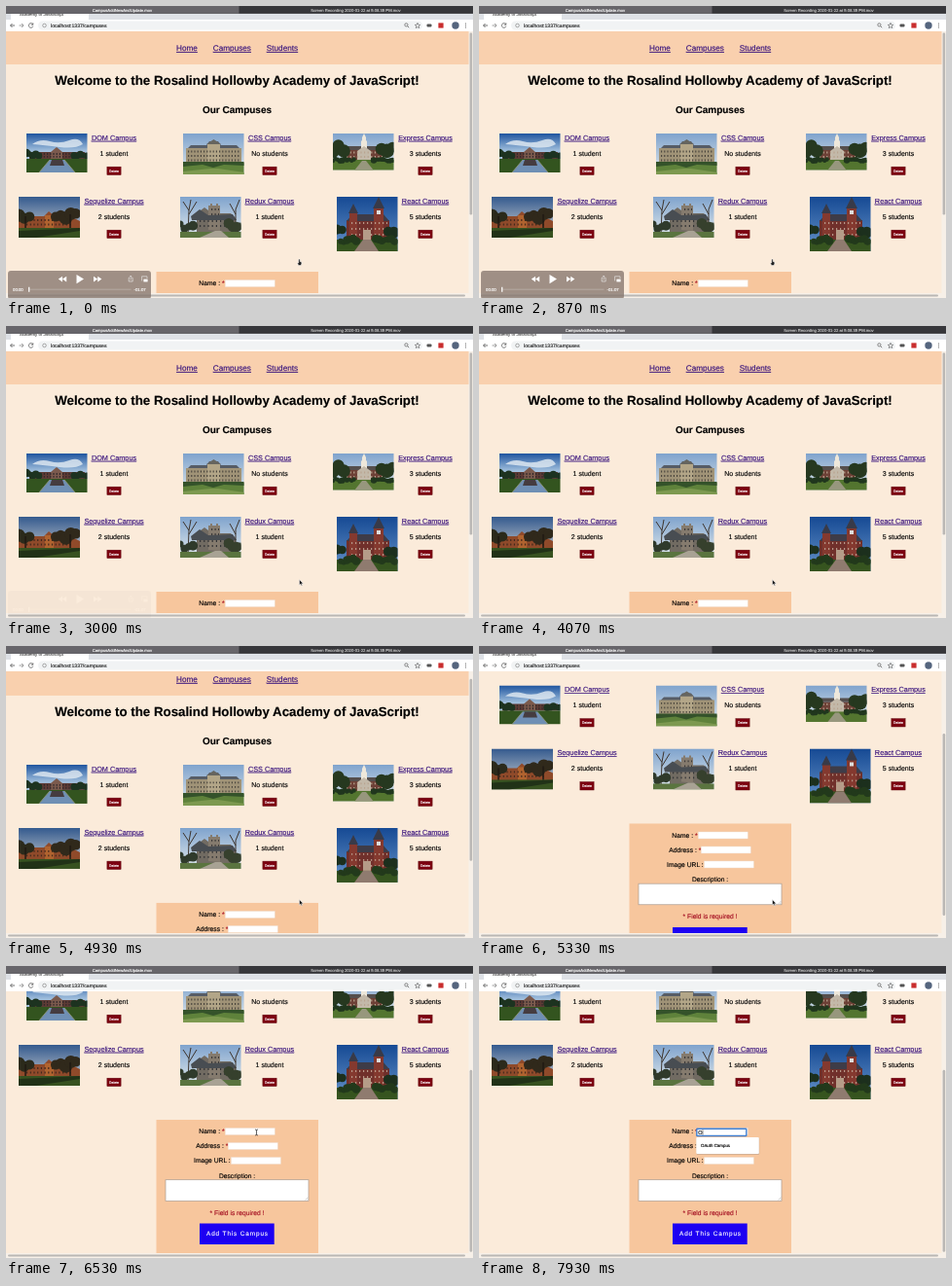
An HTML page for the animation above (8 s loop, 480 by 300 pixels).

```html
<!DOCTYPE html>
<html lang="en">
<head>
<meta charset="utf-8">
<title>Campuses</title>
<style>
html, body { margin: 0; width: 100%; height: 100%; overflow: hidden; background: #faebda; }
#stage { display: block; width: 480px; height: 300px; }
text, tspan { fill: currentColor; stroke: currentColor; stroke-width: .14px; }
text { font-family: "Liberation Sans", Arial, sans-serif; text-rendering: geometricPrecision; }
.link { color: #36107c; text-decoration: underline; text-decoration-thickness: .6px; }
.mid { text-anchor: middle; }
.req { color: #a50f22; }
</style>
</head>
<body>
<svg id="stage" viewBox="0 0 480 300" xmlns="http://www.w3.org/2000/svg">
  <defs>
    <linearGradient id="blue" x2="0" y2="1"><stop stop-color="#1f559f"/><stop offset=".7" stop-color="#a3c1de"/></linearGradient>
    <linearGradient id="deep" x2="0" y2="1"><stop stop-color="#164a94"/><stop offset=".9" stop-color="#5e8cc4"/></linearGradient>
    <linearGradient id="pale" x2="0" y2="1"><stop stop-color="#7fa3cd"/><stop offset=".8" stop-color="#cfdce6"/></linearGradient>
    <linearGradient id="dusk" x2="0" y2="1"><stop stop-color="#345a8e"/><stop offset=".7" stop-color="#a9b4c2"/></linearGradient>
  </defs>
  <rect width="480" height="300" fill="#f7f0e8"/>
  <svg y="26" width="480" height="269" viewBox="0 26 480 269">
    <rect y="26" width="475.5" height="269" fill="#fbebda"/>
    <g id="page"></g>
    <rect id="thumb" x="476.6" width="2.6" height="187" rx="1.3" fill="#bab7b4"/>
  </svg>
  <rect x="2" y="296.4" width="470" height="2.2" rx="1.1" fill="#bab7b4"/>
  <g id="chrome"></g>
  <g id="player"></g>
  <g id="mouse">
    <path id="arrow" d="M0-2.4V3.2L1.3 2 2.2 4 3.1 3.6 2.2 1.7H4Z" fill="#111" stroke="#fff" stroke-width=".5"/>
    <path id="hand" d="M-.8-2.6Q0-3.4.7-2.6V-.6L2.3 0Q2.8 2 1.5 3.6H-.8L-2 1.2Q-1.6.4-.8 1Z" fill="#222" stroke="#fff" stroke-width=".5"/>
    <path id="beam" d="M-1.4-3Q0-3 0-2V2.2Q0 3-1.4 3M1.4-3Q0-3 0-2M0 2.2Q0 3 1.4 3" fill="none" stroke="#222" stroke-width=".7"/>
  </g>
</svg>
<script>
const $ = id => document.getElementById(id);
const rect = (x, y, w, h, fill, more = '') =>
  `<rect x="${x}" y="${y}" width="${w}" height="${h}" fill="${fill}" ${more}/>`;
const text = (x, y, size, str, more = '') =>
  `<text x="${x}" y="${y}" font-size="${size}" ${more}>${str}</text>`;
const mid = (x, y, size, str, cls = '', more = '') =>
  text(x, y, size, str, `class="mid ${cls}" ${more}`);
const path = (d, fill, more = '') => `<path d="${d}" fill="${fill}" ${more}/>`;
const stroke = (d, color, width = .8) =>
  path(d, 'none', `stroke="${color}" stroke-width="${width}"`);

// Dotted rows read as windows.
const windows = (x1, x2, ys, color, gap = 3.2) => ys.map(y =>
  `<path d="M${x1} ${y}H${x2}" stroke="${color}" stroke-width="1.8" stroke-dasharray="1.2 ${gap - 1.2}"/>`).join('');

let seed = 7;
const rnd = () => (seed = seed * 16807 % 2147483647) / 2147483647;

function trees(x1, x2, y, r, color) {
  let out = '';
  for (let x = x1; x <= x2; x += r * .8) {
    out += `<circle cx="${x}" cy="${y + (rnd() - .5) * r}" r="${r * (.6 + rnd() * .5)}" fill="${color}"/>`;
  }
  return out;
}

const scenes = [
  () => rect(0, 0, 63, 26, 'url(#blue)') +
    path('M6 11Q14 5 24 8T44 7 58 11Q50 16 34 14T6 11Z', '#e3ebf3', 'opacity=".8"') +
    rect(3, 19, 57, 7, '#5d3b35') + path('M25 19L31 14 37 19V26H25Z', '#7b5a4d') +
    windows(5, 58, [21, 23.8], '#33292b') +
    trees(0, 13, 22, 4, '#1d3320') + trees(49, 63, 22, 4, '#1d3320') +
    rect(0, 26, 63, 14, '#33541f') + path('M24 27H39L50 40H13Z', '#6f8fb4') +
    path('M26 27H37L39 33H24Z', '#453c40') + stroke('M24 27L13 40M39 27L50 40', '#93987e'),
  () => rect(0, 0, 63, 42, 'url(#pale)') +
    path('M4 16L8 12H24L27 8H36L39 12H55L59 16Z', '#565c66') +
    rect(3, 15, 57, 16, '#a09377') + rect(25, 11, 13, 20, '#b3a688') +
    path('M24 11L31.5 6 39 11Z', '#66655f') +
    windows(5, 59, [18.5, 23, 27.5], '#4d483f') +
    rect(0, 30, 63, 12, '#5f823b') + path('M0 29H63V33L42 32 31 35 20 32 0 34Z', '#34522a') +
    path('M0 39L28 36H36L63 40V42H0Z', '#7d9950'),
  () => rect(0, 0, 63, 38, 'url(#pale)') +
    rect(12, 17, 40, 11, '#6d4036') + path('M12 17L15 13H49L52 17Z', '#554f4d') +
    path('M29 15V8L30 7V4L32 0 34 4V7L35 8V15Z', '#eee8db') +
    path('M25 18L32 13 39 18V28H25Z', '#c3b9a9') +
    windows(14, 51, [19.5, 24], '#b9a48f', 3.6) +
    trees(0, 14, 15, 7, '#26381f') + trees(50, 63, 15, 7, '#26381f') +
    rect(0, 27, 63, 11, '#53752f') + path('M30 28H34L42 38H22Z', '#97977d') +
    trees(0, 22, 27, 3, '#20361d') + trees(42, 63, 27, 3, '#20361d'),
  () => rect(0, 0, 63, 42, 'url(#dusk)') +
    path('M0 25L10 20H26L31 15 37 20H53L63 25V34H0Z', '#8f4a2a') +
    rect(27, 19, 9, 14, '#b0632f') + windows(8, 56, [24, 28.5], '#42291d', 3.7) +
    trees(0, 13, 19, 7, '#2b2a1b') + trees(38, 63, 20, 6.5, '#30291b') +
    stroke('M7 20V34M53 18V34', '#211a13', 1.5) +
    rect(0, 32, 63, 10, '#375220') + path('M0 35L63 32V35L18 42H0Z', '#213217'),
  () => rect(0, 0, 63, 42, 'url(#pale)') +
    path('M17 36V17L25 11 33 17H52L57 22V37H17Z', '#716b62') +
    path('M29 34V9H31V7H33V9H37V7H39V9H41V35Z', '#857b6e') +
    path('M11 20L20 13 29 19 54 18 58 24H12Z', '#484d52') +
    windows(20, 55, [25, 30], '#333436', 4.2) + windows(32, 40, [13, 18], '#3c3a3a', 3.5) +
    stroke('M8 40L9 14 3 5M9 18L17 5M9 14L11 3M57 39V13L61 3M57 18L51 7', '#3c332c', 1) +
    trees(0, 14, 30, 5.5, '#2f3a2b') + trees(50, 63, 29, 5, '#36402d') +
    rect(0, 36, 63, 6, '#5a743f') + path('M20 42L36 35H42L50 42Z', '#a8a294'),
  () => rect(0, 0, 63, 56, 'url(#deep)') +
    rect(10, 24, 44, 21, '#70302b') + path('M10 25L16 18H48L54 25Z', '#3e3c48') +
    path('M13 43V16L17 9 21 16V43ZM38 43V11L43 2 48 11V43Z', '#84392f') +
    path('M12 17L17 7 22 17ZM37 12L43 0 49 12Z', '#383a48') +
    windows(15, 52, [27, 33, 39], '#b79686', 4) + rect(41, 14, 4, 4, '#ddd') +
    rect(27, 34, 8, 10, '#b59c88') +
    trees(0, 9, 37, 7, '#1c2f1d') + trees(53, 63, 35, 7, '#1c2f1d') +
    rect(0, 44, 63, 12, '#36541f') + path('M27 44H35L43 56H18Z', '#8f7b6f') +
    trees(4, 23, 45, 4, '#22391b') + trees(40, 60, 45, 4, '#22391b')
];

// name, students, picture x, y, width, height, caption centre
const campuses = [
  ['DOM', '1 student', 21, 131, 62.5, 40, 111],
  ['CSS', 'No students', 182, 131, 62.5, 42, 271],
  ['Express', '3 students', 336, 131, 62.5, 37.5, 431],
  ['Sequelize', '2 students', 13, 196, 63, 42, 111],
  ['Redux', '1 student', 179, 196, 62.5, 42, 271],
  ['React', '5 students', 340, 196, 62.5, 56, 431]
];

const card = ([name, count, x, y, w, h, cx], i) =>
  `<svg x="${x}" y="${y}" width="${w}" height="${h}">${scenes[i]()}</svg>` +
  mid(cx, y + 6.7, 7.3, name + ' Campus', 'link') +
  mid(cx, y + 22.7, 7, count) +
  rect(cx - 7.1, y + 34.2, 14.2, 8.3, '#7d0010', 'stroke="#5c0009" stroke-width=".5"') +
  mid(cx, y + 39.6, 3.5, 'Delete', '', 'color="#fff"');

const field = (label, x, y, inputX, star) =>
  text(x, y, 6.75, label + (star ? ' <tspan class="req">*</tspan>' : '')) +
  rect(inputX, y - 5.9, 51, 7, '#fff', 'stroke="#eadbce" stroke-width=".4"');

const form = rect(154.5, 273, 166.5, 140, '#f7c69d') +
  field('Name :', 198.3, 287.4, 225.3, true) +
  field('Address :', 195.3, 302.4, 228.3, true) +
  field('Image URL :', 193, 317.4, 231.4) +
  mid(237.5, 332.5, 6.7, 'Description :') +
  rect(164, 334.7, 147, 21.6, '#fff', 'stroke="#a99c92" stroke-width=".7"') +
  stroke('M307.5 355.5L310.5 352.5M309.3 355.5L310.5 354.3', '#999', .4) +
  mid(237.5, 370.6, 6.7, '* Field is required !', 'req') +
  rect(199, 379.5, 76.7, 21.5, '#1d00f2') +
  mid(238, 392.4, 6.4, 'Add This Campus', '', 'color="#fff" letter-spacing=".88"') +
  `<g id="focus">${rect(223.8, 282.2, 51, 7.3, '#fff', 'stroke="#3f7ed0" stroke-width="1.4" rx=".6"')}
    <g id="typed">${text(225.3, 288, 5.6, 'O')}</g><path id="caret" d="M0 283.3V288.6" stroke="#111" stroke-width=".5"/></g>` +
  `<g id="hint">${rect(223.6, 291.6, 64.6, 17.2, '#c9ab92', 'rx="1"')}${rect(223.3, 291, 64.5, 17, '#fff', 'rx="1"')}
    ${text(228, 301.2, 4.4, 'OAuth Campus')}</g>`;

$('page').innerHTML = rect(0, 20, 475.5, 40, '#f9d0ae') +
  mid(186, 46, 8.2, 'Home', 'link') + mid(232.4, 46, 8.2, 'Campuses', 'link') + mid(284, 46, 8.2, 'Students', 'link') +
  mid(237.5, 80.6, 13.3, 'Welcome to the Rosalind Hollowby Academy of JavaScript!', '', 'font-weight="bold"') +
  mid(237.5, 109.7, 10, 'Our Campuses', '', 'font-weight="bold"') +
  campuses.map(card).join('') + form;

$('chrome').innerHTML = rect(0, 6, 480, 8.5, '#dee1e6') + rect(5, 7, 80, 8, '#fff', 'rx="2"') +
  text(14, 10, 4.4, 'Academy of JavaScript', 'color="#555"') +
  rect(0, 0, 480, 7.9, '#37373b') + rect(0, 0, 239.5, 7.9, '#67656a') +
  mid(119.5, 5.5, 4.2, 'CampusAddNewAndUpdate.mov', '', 'color="#fff"') +
  mid(359.5, 5.5, 4.2, 'Screen Recording 2020-01-22 at 5.08.35 PM.mov', '', 'color="#ccc"') +
  rect(0, 14, 480, 12, '#fff') + rect(33, 15.4, 395, 9.2, '#f1f3f4', 'rx="4.6"') +
  stroke('M9 20H4.5M6.5 18L4.5 20 6.5 22', '#555') + stroke('M13.5 20H18M16 18L18 20 16 22', '#888') +
  stroke('M27.5 18.7A2.3 2.3 0 1 0 27.8 20.7M27.8 17.4V19.2H26', '#555') +
  '<circle cx="39.5" cy="20" r="1.8" fill="none" stroke="#777" stroke-width=".6"/>' +
  text(46, 21.8, 5.1, 'localhost:1337/campuses', 'color="#222"') +
  '<circle cx="411.4" cy="19.4" r="1.6" fill="none" stroke="#555" stroke-width=".7"/>' + stroke('M412.6 20.6L414.2 22.2', '#555') +
  stroke('M423 17.4L423.8 19.2 425.7 19.4 424.3 20.7 424.7 22.6 423 21.6 421.3 22.6 421.7 20.7 420.3 19.4 422.2 19.2Z', '#555', .6) +
  rect(432.5, 18.6, 5, 2.8, '#555', 'rx="1"') + rect(444.4, 17.4, 5.2, 5.2, '#c92e2e') +
  '<circle cx="462" cy="20" r="3.7" fill="#55657e"/>' +
  [18, 20, 22].map(y => `<circle cx="472.5" cy="${y}" r=".6" fill="#555"/>`).join('');

$('player').innerHTML = rect(2, 272, 147, 29, '#86776d', 'rx="3" fill-opacity=".78"') +
  path('M58 277.8V283.4L53.8 280.6ZM62.2 277.8V283.4L58 280.6ZM72.5 276V285.2L80 280.6ZM90 277.8V283.4L94.2 280.6ZM94.2 277.8V283.4L98.4 280.6Z', '#fff') +
  stroke('M127 279.3H126.2V283H130.2V279.3H129.4M128.2 281.5V277.2M127 278.3L128.2 277.1 129.4 278.3M139.6 282.4V277.8H145V280', '#eee', .6) +
  rect(141.4, 280.6, 4.2, 2.8, '#fff') +
  text(7, 292.6, 4.3, '00:00', 'color="#fff"') + text(131.5, 292.6, 4.3, '-01:07', 'color="#fff"') +
  stroke('M24 291.2H128.5', '#b5aaa2', 1) + stroke('M23.7 288.7V293.7', '#fff', 1.2);

// [time, value] pairs
const tracks = {
  scroll: [[4867, 0], [4933, 9], [5067, 38], [5200, 69], [5333, 90.5], [5467, 102], [5600, 110], [5733, 115]],
  player: [[2667, 1], [2733, .85], [2867, .42], [2933, .2], [3000, .06], [3133, 0]],
  x: [[5780, 301.5], [6000, 291], [6260, 266], [6500, 257.5]],
  y: [[5780, 263], [6000, 238], [6260, 190], [6500, 171]]
};

function at(keys, t) {
  const i = keys.findIndex(k => k[0] > t);
  if (i === 0) return keys[0][1];
  if (i < 0) return keys[keys.length - 1][1];
  const [t0, a] = keys[i - 1], [t1, b] = keys[i];
  return a + (b - a) * (t - t0) / (t1 - t0);
}

const show = (id, on) => $(id).setAttribute('visibility', on ? 'visible' : 'hidden');
const STEP = 200 / 3, LOOP = 8000, FOCUS = 6930, TYPE = 7925;

function draw(now) {
  const t = Math.floor((now % LOOP + 5) / STEP) * STEP;
  const scroll = at(tracks.scroll, t);
  $('page').setAttribute('transform', `translate(0 ${-scroll})`);
  $('thumb').setAttribute('y', 27.5 + scroll * .69);
  $('player').setAttribute('opacity', at(tracks.player, t));

  const x = at(tracks.x, t), y = at(tracks.y, t), typed = t >= TYPE;
  const onText = t > 5780 && (y < 175 || y > 220 && y < 241);
  $('mouse').setAttribute('transform', `translate(${x} ${y})`);
  show('hand', t < 2700);
  show('arrow', t >= 2700 && !onText);
  show('beam', onText && !typed);

  show('focus', t >= FOCUS);
  show('typed', typed);
  show('hint', typed);
  show('caret', typed || t >= FOCUS && (t - FOCUS) % 1000 < 500);
  $('caret').setAttribute('transform', `translate(${typed ? 230 : 225.6} 0)`);
}

function tick() {
  draw(performance.now());
  requestAnimationFrame(tick);
}
tick();
</script>
</body>
</html>
```
